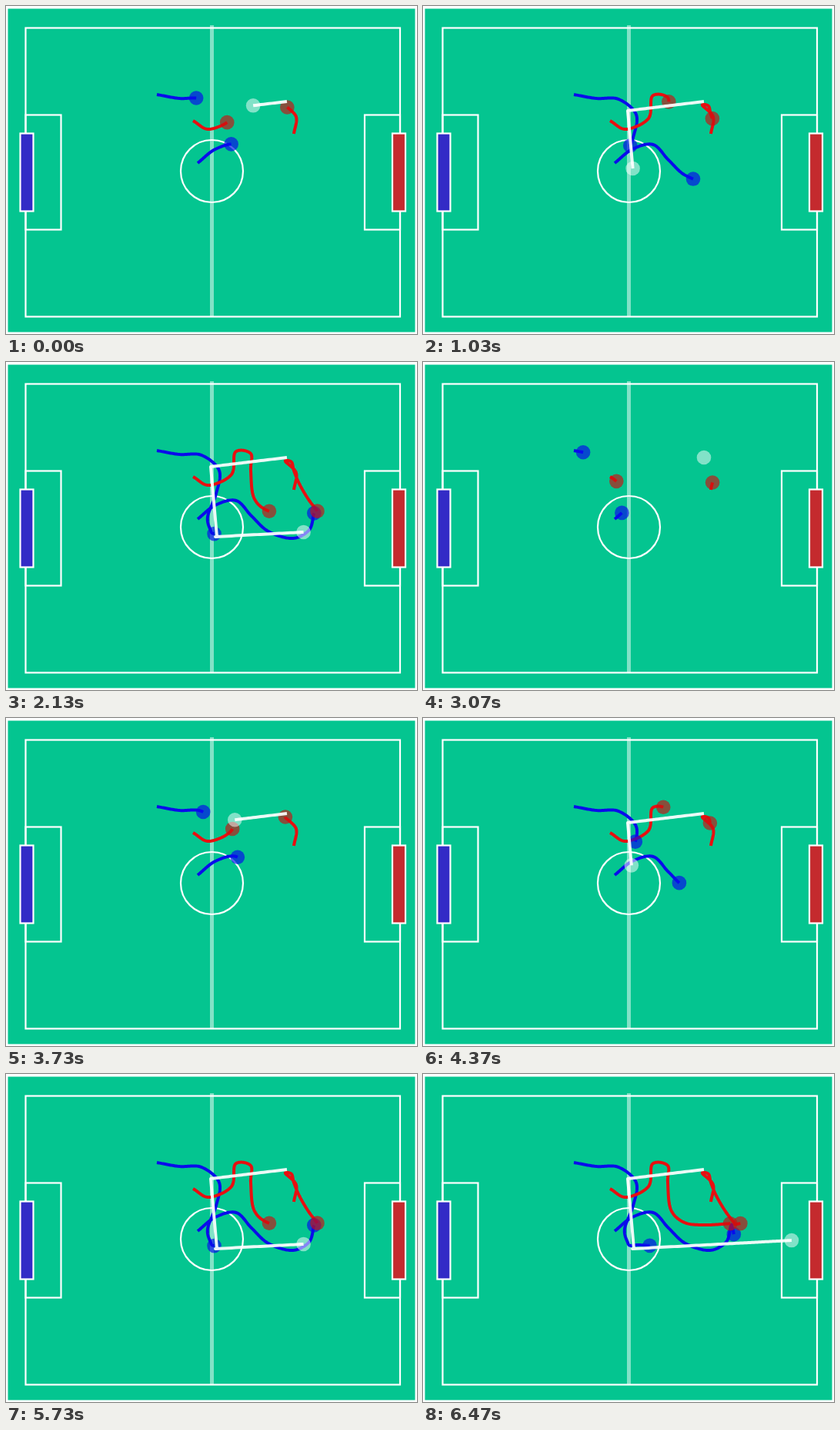
Write an HTML page with a canvas that moves like this. It is 534 by 426 pixels and loops after 6510 ms.

```html
<!DOCTYPE html>
<html lang="en">
<head>
<meta charset="utf-8">
<title>Football play</title>
<style>
  html, body { margin: 0; width: 100%; height: 100%; overflow: hidden; background: #fff; }
  canvas { display: block; filter: blur(.6px); }
</style>
</head>
<body>
<canvas id="pitch" width="534" height="426"></canvas>
<script>
const ctx = document.getElementById('pitch').getContext('2d');
const LOOP = 6510, STEPS = 195, PLAY = 108, FIRST = 21;
const GAP = 12; // steps between the key points of a run

const BLUE = { line: '#0a0ceb', disc: 'rgba(8,12,235,.67)' };
const RED = { line: '#e80f10', disc: 'rgba(205,15,15,.65)' };
const WHITE = { line: 'rgba(255,255,255,.92)', disc: 'rgba(255,255,255,.5)' };

const runs = [
  { ...BLUE, x: [196, 225, 254, 277, 273, 262, 266, 270, 279, 296],
             y: [115, 120, 121, 141, 171, 201, 219, 223, 222, 223] },
  { ...BLUE, x: [249, 272, 299, 319, 341, 372, 394, 400, 402, 404],
             y: [204, 186, 180, 200, 220, 229, 218, 197, 199, 209] },
  { ...RED,  x: [243, 264, 293, 298, 318, 318, 322, 340, 368, 402],
             y: [149, 160, 146, 117, 119, 141, 176, 193, 196, 194] },
  { ...RED,  x: [374, 377, 363, 371, 374, 381, 392, 404, 406, 413],
             y: [166, 144, 129, 130, 141, 158, 177, 193, 195, 194] }
];

// Each kick loses speed by friction and stops at its end point
const kicks = [
  { at: 15, from: [365, 124], to: [266, 136], reach: 2.04, drag: 0.96 },
  { at: 31.5, from: [266, 136], to: [274, 227], reach: 1.2, drag: 0.945 },
  { at: 71.5, from: [272, 227], to: [480, 216], reach: 1.3, drag: 0.96 }
];

// Smooth curve through evenly timed values
function spline(v, t) {
  const i = Math.min(v.length - 2, Math.floor(t / GAP)), u = t / GAP - i;
  const b = v[i], c = v[i + 1];
  const a = v[i - 1] ?? 2 * b - c, d = v[i + 2] ?? 2 * c - b;
  return b + u / 2 * (c - a + u * (2 * a - 5 * b + 4 * c - d + u * (3 * (b - c) + d - a)));
}

function kicked(t) {
  const k = kicks.filter(k => t >= k.at).pop();
  if (!k) return kicks[0].from;
  const s = Math.min(1, k.reach * (1 - k.drag ** (t - k.at)));
  return k.from.map((v, i) => v + (k.to[i] - v) * s);
}

const players = runs.map(r => ({ ...r, pos: t => [spline(r.x, t), spline(r.y, t)] }));
const ball = { ...WHITE, pos: kicked };

function box(x, y, w, h, fill) {
  if (fill) {
    ctx.fillStyle = fill;
    ctx.fillRect(x, y, w, h);
  }
  ctx.strokeRect(x, y, w, h);
}

function circle(x, y, r) {
  ctx.beginPath();
  ctx.arc(x, y, r, 0, Math.PI * 2);
}

function drawPitch() {
  ctx.fillStyle = '#fff';
  ctx.fillRect(0, 0, 534, 426);
  ctx.fillStyle = '#04c590';
  ctx.fillRect(2.5, 3.5, 529, 420);
  ctx.fillStyle = 'rgba(255,255,255,.5)';
  ctx.fillRect(265, 25, 5, 379);
  ctx.strokeStyle = '#fff';
  ctx.lineWidth = 2.2;
  ctx.lineJoin = 'miter';
  box(25.5, 28.5, 486.5, 375);
  box(25.5, 141.5, 46, 149);
  box(466, 141.5, 46, 149);
  circle(267.5, 214.5, 40.5);
  ctx.stroke();
  box(18.5, 165.5, 17, 101, '#332bc6');
  box(502, 165.5, 17, 101, '#c42a2e');
}

function drawTrail(m, t) {
  ctx.beginPath();
  for (let s = 0; s <= t; s += 0.5) ctx.lineTo(...m.pos(s));
  ctx.strokeStyle = m.line;
  ctx.lineWidth = 4;
  ctx.lineJoin = 'round';
  ctx.stroke();
}

function drawDisc(m, t) {
  circle(...m.pos(t), 9.3);
  ctx.fillStyle = m.disc;
  ctx.fill();
}

function draw(ms) {
  const step = Math.min(STEPS - 1, Math.floor((ms + 4) * 0.03));
  const t = (step + FIRST) % PLAY;
  drawPitch();
  players.forEach(p => drawTrail(p, t));
  players.forEach(p => drawDisc(p, t));
  drawTrail(ball, t);
  drawDisc(ball, t);
}

const begin = performance.now();
function tick() {
  draw((performance.now() - begin) % LOOP);
  requestAnimationFrame(tick);
}
tick();
</script>
</body>
</html>
```
